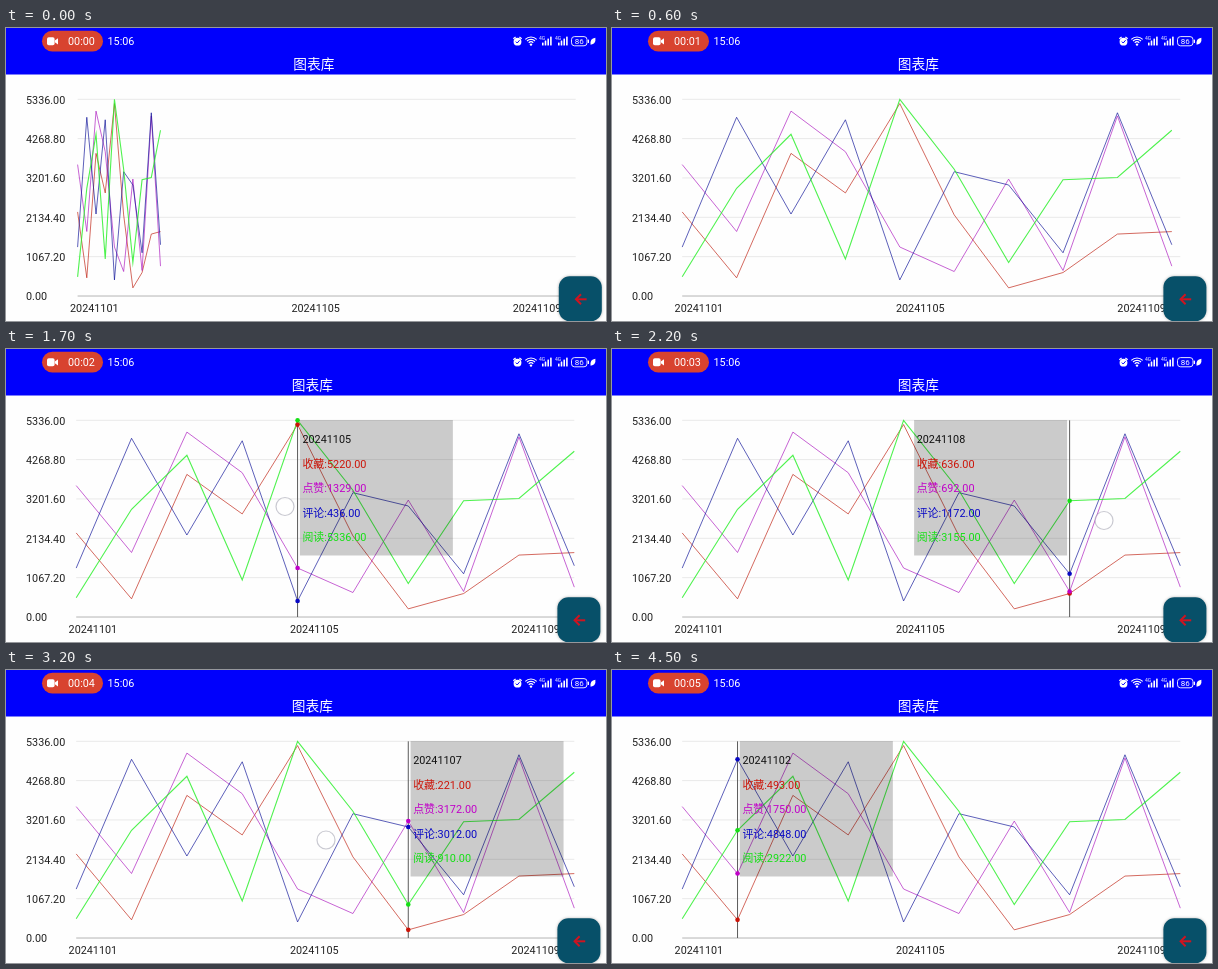
Write an HTML page with a canvas that moves like this. It is 600 px wide and 293 px high and loops after 4.6 s.

```html
<!DOCTYPE html>
<html lang="zh">
<head>
<meta charset="utf-8">
<title>图表库</title>
<style>
html, body { margin: 0; width: 100%; height: 100%; overflow: hidden; background: #fefefe; }
canvas { display: block; width: 600px; height: 293px; }
</style>
</head>
<body>
<canvas id="stage"></canvas>
<script>
const W = 600, H = 293, LOOP = 4600, STEP = 100;
const LEFT = 70.2, RIGHT = 568.3, TOP = 71.3, BOTTOM = 268, MAX = 5336;
const GAP = (RIGHT - LEFT) / 9;
const FONT = '"Noto Sans CJK SC", "Noto Sans CJK", Roboto, sans-serif';
const NUM = 'Roboto, "Noto Sans CJK SC", "Noto Sans CJK", sans-serif';

const series = [
  { name: '收藏', color: '#cc1408', line: 'rgba(190,30,15,.78)', data: [2280, 493, 3869, 2796, 5220, 2200, 221, 636, 1680, 1747] },
  { name: '点赞', color: '#c000c8', line: 'rgba(170,20,190,.78)', data: [3565, 1750, 5016, 3914, 1329, 664, 3172, 692, 4885, 810] },
  { name: '评论', color: '#0808c4', line: 'rgba(10,15,150,.78)', data: [1327, 4848, 2224, 4780, 436, 3372, 3012, 1172, 4970, 1390] },
  { name: '阅读', color: '#14e014', line: 'rgba(40,240,40,.82)', data: [520, 2922, 4386, 1005, 5336, 3440, 910, 3155, 3215, 4496] }
];

// Finger path: time, x, y
const PRESS = 1300, RELEASE = 4150, LAG = 150;
const path = [
  [1300, 274, 157], [1550, 276, 157], [1700, 279, 157.5], [2050, 438, 170],
  [2200, 492, 171.5], [2450, 542, 172], [2700, 532, 174], [2900, 460, 174],
  [3050, 395, 173], [3200, 320, 170], [3430, 205, 150], [3600, 191.5, 145],
  [4000, 132, 148], [4600, 128, 150]
];

const canvas = document.getElementById('stage');
const ctx = canvas.getContext('2d');
const ratio = window.devicePixelRatio || 1;
canvas.width = W * ratio;
canvas.height = H * ratio;

const yOf = v => BOTTOM - v / MAX * (BOTTOM - TOP);
const xOf = i => LEFT + i * GAP;

function fingerAt(t) {
  let i = 0;
  while (i < path.length - 2 && path[i + 1][0] <= t) i++;
  const [t0, x0, y0] = path[i], [t1, x1, y1] = path[i + 1];
  const k = (t - t0) / (t1 - t0);
  return { x: x0 + (x1 - x0) * k, y: y0 + (y1 - y0) * k };
}

// cubic-bezier(.42, 0, .58, 1)
function easeInOut(x) {
  if (x >= 1) return 1;
  let a = 0, b = 1;
  for (let n = 0; n < 24; n++) {
    const s = (a + b) / 2, r = 1 - s;
    if (1.26 * r * r * s + 1.74 * r * s * s + s * s * s < x) a = s; else b = s;
  }
  return a * a * (3 - 2 * a);
}

function text(str, x, y, size, color, family = NUM, align = 'left') {
  ctx.font = size + 'px ' + family;
  ctx.textAlign = align;
  ctx.fillStyle = color;
  ctx.fillText(str, x, y);
}

function line(points, color, width) {
  ctx.beginPath();
  points.forEach(([x, y]) => ctx.lineTo(x, y));
  ctx.strokeStyle = color;
  ctx.lineWidth = width;
  ctx.stroke();
}

function box(x, y, w, h, r, color) {
  ctx.beginPath();
  ctx.roundRect(x, y, w, h, r);
  ctx.fillStyle = color;
  ctx.fill();
}

function dot(x, y, r, color) {
  ctx.beginPath();
  ctx.arc(x, y, r, 0, Math.PI * 2);
  ctx.fillStyle = color;
  ctx.fill();
}

function signal(x) {
  text('4G', x, 12, 5, '#fff');
  for (let i = 0; i < 4; i++) {
    const h = 3 + i * 2;
    box(x + 3 + i * 2.7, 17.5 - h, 1.6, h, 0.5, '#fff');
  }
}

function statusBar(t) {
  box(36, 2.8, 61, 20.8, 10.4, '#d8432f');
  box(41, 9.3, 7.6, 8, 1.8, '#fff');
  ctx.beginPath();
  ctx.moveTo(48.8, 12.6);
  ctx.lineTo(52, 10.2);
  ctx.lineTo(52, 16.6);
  ctx.lineTo(48.8, 14.2);
  ctx.fill();
  const sec = Math.floor((t + 900) / 1000);
  text('00:0' + sec, 62, 17.3, 10.8, '#fff');
  text('15:06', 101.5, 17.3, 10.8, '#fff');

  // alarm
  dot(511.5, 13.7, 3.9, '#fff');
  line([[507.3, 10.8], [509.6, 9]], '#fff', 1.2);
  line([[513.4, 9], [515.7, 10.8]], '#fff', 1.2);
  line([[509.8, 13.6], [511.2, 15], [513.6, 12.2]], '#00f', 1);

  // wifi
  for (const r of [3.2, 5.6, 8]) {
    ctx.beginPath();
    ctx.arc(525, 17, r, -Math.PI * 0.75, -Math.PI * 0.25);
    ctx.strokeStyle = '#fff';
    ctx.lineWidth = 1.2;
    ctx.stroke();
  }
  dot(525, 16.6, 1.2, '#fff');
  signal(533);
  signal(549);

  // battery
  ctx.beginPath();
  ctx.roundRect(565.5, 8.6, 15.5, 9.2, 3);
  ctx.strokeStyle = '#fff';
  ctx.lineWidth = 0.9;
  ctx.stroke();
  box(581.8, 11.6, 1.2, 3.4, 0.6, '#fff');
  text('86', 573.2, 16.2, 8, '#fff', NUM, 'center');

  // leaf
  ctx.beginPath();
  ctx.moveTo(584.6, 16.8);
  ctx.quadraticCurveTo(583.6, 10.4, 589.4, 9.8);
  ctx.quadraticCurveTo(590.2, 16, 584.6, 16.8);
  ctx.fillStyle = '#fff';
  ctx.fill();
}

function chart(t, shift) {
  for (let i = 0; i <= 5; i++) {
    const v = MAX * i / 5, y = yOf(v);
    line([[LEFT + shift, y], [RIGHT + shift, y]], i ? '#e9e9e9' : '#b4b4b4', 1);
    text(v.toFixed(2), 20, y + 4.2, 10.8, '#222');
  }
  for (const i of [0, 4, 8]) text('2024110' + (i + 1), xOf(i) - 7.6 + shift, 283.6, 10.8, '#222');
  const grow = easeInOut(0.283 + t * 0.00104);
  for (const s of series) {
    const pts = s.data.map((v, i) => [LEFT + shift + i * GAP * grow, yOf(v)]);
    line(pts, s.line, s.name === '阅读' ? 1.1 : 0.85);
  }
}

function tooltip(t) {
  if (t < PRESS + LAG) return;
  const i = Math.max(0, Math.min(9, Math.round((fingerAt(t - LAG).x - LEFT) / GAP)));
  const x = xOf(i), w = 153;
  const left = x + 2.3 + w > RIGHT ? x - 2.5 - w : x + 2.3;
  line([[x, TOP], [x, BOTTOM]], '#5a5a5a', 1);
  for (const s of series) dot(x, yOf(s.data[i]), 2.3, s.color);
  box(left, TOP - 0.3, w, 135.5, 0, 'rgba(0,0,0,.2)');
  text(String(20241101 + i), left + 2.6, 94.4, 10.8, '#111');
  series.forEach((s, n) => {
    text(s.name + ':' + s.data[i].toFixed(2), left + 2.6, 118.9 + n * 24.5, 10.9, s.color);
  });
}

function touch(t) {
  if (t < PRESS || t >= RELEASE) return;
  const p = fingerAt(t);
  dot(p.x, p.y, 9, 'rgba(255,255,255,.55)');
  ctx.strokeStyle = 'rgba(150,150,165,.5)';
  ctx.lineWidth = 1.2;
  ctx.stroke();
}

function backButton(shift) {
  const x = 551.4 + shift;
  ctx.save();
  ctx.shadowColor = 'rgba(0,0,0,.3)';
  ctx.shadowBlur = 3 * ratio;
  box(x, 248.3, 43, 45, 11, '#075069');
  ctx.restore();
  const cx = x + 21.8, cy = 271.3;
  line([[cx - 4, cy], [cx + 6, cy]], '#cf1420', 2);
  line([[cx + 0.4, cy - 5], [cx - 4.6, cy], [cx + 0.4, cy + 5]], '#cf1420', 2);
}

function draw(t) {
  const shift = 1.4 * Math.max(0, 1 - t / 300);
  ctx.setTransform(ratio, 0, 0, ratio, 0, 0);
  ctx.fillStyle = '#fefefe';
  ctx.fillRect(0, 0, W, H);
  box(0, 0, W, 46.6, 0, '#0000fc');
  statusBar(t);
  text('图表库', 306.4 + shift, 41.2, 13.7, '#fff', FONT, 'center');
  chart(t, shift);
  tooltip(t);
  touch(t);
  backButton(shift);
}

const start = performance.now();
function tick() {
  const t = (performance.now() - start) % LOOP;
  draw(Math.floor(t / STEP) * STEP);
  requestAnimationFrame(tick);
}
tick();
</script>
</body>
</html>
```
